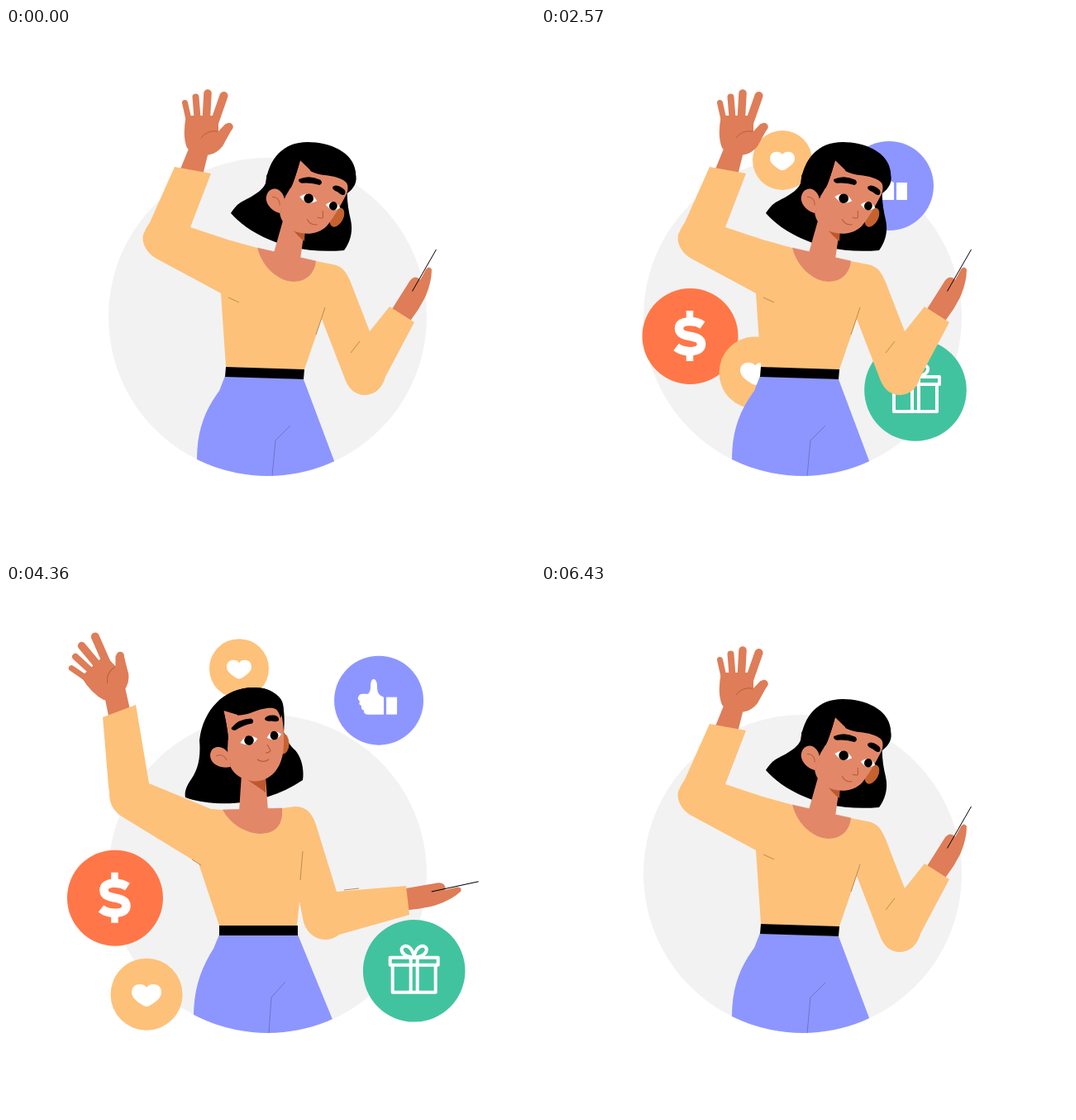
Write an HTML page that moves like this. It is 640 px wide and 640 px high and loops after 7.21 s.

```html
<!DOCTYPE html>
<html lang="en">
<head>
<meta charset="utf-8">
<title>Waving woman with reward icons</title>
<style>
  html, body { margin: 0; width: 100%; height: 100%; overflow: hidden; background: #fff; }
  svg { display: block; width: 100%; height: 100%; }
</style>
</head>
<body>
<svg viewBox="0 0 640 640" xmlns="http://www.w3.org/2000/svg">
  <defs>
    <clipPath id="disc"><circle cx="316.5" cy="349.5" r="192.5"/></clipPath>
    <clipPath id="open"><rect id="lidEdge" x="-16" y="-8" width="32" height="20"/></clipPath>
    <path id="heart" d="M0-7C-3-12-15-12-15-2C-15 4-8 8-3 11.5Q0 13 3 11.5C8 8 15 4 15-2C15-12 3-12 0-7Z" fill="#fff"/>
    <g id="thumb" fill="#fff">
      <path d="M6 17L-14 17Q-19 16-18 12Q-22 11-21 6.5Q-25 5-23 1Q-27-2-24-6Q-23-8-20-8L-13-8Q-10-11-10-17Q-10-26-6-26Q-2-25-2-16Q-2-9 2-6L6-4Z"/>
      <rect x="9" y="-4" width="13" height="21"/>
    </g>
    <g id="dollar" fill="none" stroke="#fff">
      <path d="M15-13.500C7-19-13.500-21-13.500-9.500C-13.500 4 13.500-4 13.500 9.500C13.500 21-8 20-17 13" stroke-width="10.500"/>
      <path d="M-.5-31V-18M-.5 18V30" stroke-width="8.500"/>
    </g>
    <g id="gift" fill="none" stroke="#fff" stroke-width="4" stroke-linejoin="round">
      <rect x="-29" y="-16" width="58" height="9"/>
      <path d="M-26-6V26H26V-6M-4-16V26M4-16V26"/>
      <path d="M0-16C-10-17-16-21-15-27C-12-33-2-31 0-16C2-31 12-33 15-27C16-21 10-17 0-16"/>
    </g>
    <g id="eye">
      <path d="M-11 1Q-1-11 10.500 0Q1 10-11 1Z" fill="#fff"/>
      <circle r="5.800"/>
    </g>
  </defs>

  <circle cx="316.5" cy="349.5" r="192.5" fill="#f2f2f2"/>
  <g id="dashes" stroke="#42c39f" stroke-width="8" stroke-linecap="round"></g>
  <g id="icons"></g>

  <path id="hair"/>
  <g clip-path="url(#disc)">
    <path id="pants" fill="#8d96ff"/>
    <path id="crease" fill="none" stroke="#6c74cc"/>
  </g>
  <path id="neck" fill="#e28869"/>
  <path id="shade" fill="#bd582e"/>
  <path id="chest" fill="#e28869" stroke="#e28869" stroke-width=".6"/>
  <path id="forearm" fill="#de7d58"/>
  <g id="wave" fill="#de7d58" stroke-linecap="round">
    <path d="M218 106Q213 130 219 145Q226 153 245 153.500Q255 152 262 143L273.500 122L266 115.500L257 125V106Z"/>
    <g stroke="#de7d58">
      <path d="M222 115L216.500 90.500" stroke-width="7"/>
      <path d="M232 115L229.500 83.500" stroke-width="8"/>
      <path d="M242 115L244 79" stroke-width="9.500"/>
      <path d="M252 115L263.500 82" stroke-width="10"/>
      <path d="M256 138L270 119.500" stroke-width="9.500"/>
    </g>
    <path d="M236 133Q243 123 256 125" fill="none" stroke="#b5603c"/>
  </g>
  <g id="palm">
    <path d="M459 353L467 340L486 310Q490 302 495 301.500Q500 302 501 305L508 292Q512 287 515 292Q515 308 507 326Q500 340 490 353L483 365Z" fill="#de7d58"/>
    <path d="M491.500 318.500L520.500 268" stroke="#000"/>
  </g>
  <path id="sweater" fill="#fdc17a"/>
  <path id="folds" fill="none" stroke="#b98d50"/>
  <path id="belt"/>

  <g id="head">
    <ellipse cx="335" cy="192" rx="7.500" ry="12.500" fill="#c5622f"/>
    <path id="face" fill="#e28869"/>
    <path d="M263.500 153C275 160 288 158 298 154C308 150 320 147 326 150C329 152 331 156 332 161C337 152 337 142 330 135C322 127 312 124 300 124C265 124 238 150 236 188L252 205L270 186Z"/>
    <path d="M272 220C264 222 254 220 249 213C244 204 249 195 258 196C264 197 268 201 270 205Z" fill="#e28869"/>
    <path d="M254 207Q263 203 267 212" fill="none" stroke="#b5603c"/>
    <path d="M263.500 152C267 167 271 182 268 204L280 204L280 157Z" fill="#e28869"/>
    <path d="M272.500 173Q281 162 296 161.500Q301 163 298 167.500Q288 169 278 175.500Q273 176.500 272.500 173Z"/>
    <path d="M313 162Q314.500 157 324 157.500Q331 158.500 330 164Q328 166 321 164.500Q314 165.500 313 162Z"/>
    <g id="lids" fill="#d06b42">
      <ellipse cx="294" cy="187" rx="11" ry="6" transform="rotate(-11 294 187)"/>
      <ellipse cx="324.5" cy="182" rx="9" ry="5.500" transform="rotate(-11 324.500 182)"/>
    </g>
    <g transform="translate(294 188) rotate(-11)"><use href="#eye" clip-path="url(#open)"/></g>
    <g transform="translate(324.500 182) rotate(-11) scale(.84 .92)"><use href="#eye" clip-path="url(#open)"/></g>
    <path d="M316 193L320 200Q319 203 314 203M304 211Q311 216 318 211" fill="none" stroke="#b9572f"/>
  </g>
</svg>

<script>
const LOOP = 7210;
const $ = id => document.getElementById(id);
const clamp = x => Math.min(1, Math.max(0, x));
const smooth = x => x * x * (3 - 2 * x);
const cubic = x => x < .5 ? 4 * x ** 3 : 1 - 4 * (1 - x) ** 3;
const seg = (t, start, dur, ease = smooth) => ease(clamp((t - start) / dur));
const blend = (a, m, b, p) => a + (b - a) * p + 4 * p * (1 - p) * (m - (a + b) / 2);

function make(tag, attrs, parent) {
  const el = document.createElementNS('http://www.w3.org/2000/svg', tag);
  for (const k in attrs) el.setAttribute(k, attrs[k]);
  return parent.appendChild(el);
}

// Paths bend from the leaning pose through the middle to the waving pose.
function morph(id, a, b, mid) {
  const nums = s => s.match(/[\d.]+/g).map(Number);
  const A = nums(a), B = nums(b), M = mid ? nums(mid) : A.map((v, i) => (v + B[i]) / 2);
  return p => {
    let i = 0;
    $(id).setAttribute('d', a.replace(/[\d.]+/g, () => {
      const v = blend(A[i], M[i], B[i], p);
      i++;
      return v.toFixed(2);
    }));
  };
}

function rigid(id, origin, a, m, b, turn) {
  return p => {
    const x = blend(a[0], m[0], b[0], p), y = blend(a[1], m[1], b[1], p);
    $(id).setAttribute('transform',
      `translate(${x} ${y}) rotate(${turn(p)}) translate(${-origin[0]} ${-origin[1]})`);
  };
}

const collarA = '304 266 C310 290 330 307 348 307 C365 307 374 295 375 282';
const collarM = '282 273 C291 293 308 308 327 308 C345 308 355 297 355 280';
const collarB = '262 272 C272 291 292 301 308 301 C327 301 336 289 334 270';

const body = [
  morph('hair',
    'M365 138 C335 138 318 158 314 188 C308 202 285 208 279 215 C276 218 273 222 272 224 C293 248 340 275 409 269 C417 258 420 245 417 232 C414 220 412 205 413 194 C420 194 424 186 423 174 C420 150 392 138 365 138Z',
    'M300 124 C265 124 238 150 234 188 C236 212 231 226 222 238 C217 246 216 252 217 257 C250 269 310 269 359 236 C361 222 357 208 350 200 C343 194 340 188 336 178 C337 165 337 155 335 146 C332 133 318 124 300 124Z',
    'M335 137 C298 137 276 160 274 195 C274 210 262 220 252 231 C246 237 243 242 242 247 C268 267 330 279 385 259 C391 245 389 235 385 224 C379 212 378 200 377 186 C381 180 382 172 380 163 C375 147 355 137 335 137Z'),
  morph('pants',
    'M265 421 L360 425 L405 545 L231 545 L231 522 C231 490 239 464 258 439Z',
    'M258 423 L353 423 L403 545 L226 545 L227 518 C228 485 237 462 251 440Z'),
  morph('crease', 'M344 481 L326 499 L322 542', 'M338 480 L321 499 L318 542'),
  morph('neck',
    'M337 226 L324 272 L340 290 L356 280 L361 245Z',
    'M285 228 L282 274 L300 285 L317 274 L314 232Z',
    'M310 230 L304 276 L320 290 L337 281 L338 240Z'),
  morph('shade',
    'M347 244 Q354 253 361 258 L362 242Z',
    'M288 233 Q303 243 314 251 L314 230Z',
    'M318 242 Q329 254 337 259 L338 238Z'),
  morph('chest', `M${collarA}Z`, `M${collarB}Z`, `M${collarM}Z`),
  morph('forearm',
    'M221 146 L208 178 L237 182 L245 150Z',
    'M119 134 L126 168 L153 164 L144 124Z'),
  morph('sweater',
    `M204 168 L248 176 L223 241 L268 256 L${collarA} L395 286 C408 288 412 297 416 305 L440 367 L464 337 L494 356 L459 422 C454 440 442 444 434 444 C422 444 415 436 411 427 L382 352 L361 413 L266 410 L260 321 L182 279 C167 271 162 254 168 246 C170 240 173 238 175 233Z`,
    `M117 160 L157 145 L173 240 L248 271 L${collarB} L350 268 C366 268 372 281 375 290 L400 371 L484 364 L488 399 L403 423 C396 428 392 429 385 429 C372 428 364 420 360 408 L355 383 L352 412 L258 412 L233 337 L140 280 C128 272 125 262 125 252 C125 248 124 246 124 243Z`,
    `M161 164 L204 161 L196 245 L262 271 L${collarM} L373 282 C385 284 390 293 393 300 L422 377 L478 349 L497 378 L428 433 C422 439 416 441 410 441 C398 440 391 434 388 425 L367 367 L356 412 L262 411 L247 334 L158 283 C146 275 144 265 146 252 C147 248 147 246 148 243Z`),
  morph('folds',
    'M269 326 L282 332 M386 338 L375 371 M428 379 L417 393',
    'M225 332 L236 339 M359 322 L356 357 M427 367 L409 369',
    'M247 334 L258 340 M373 335 L366 369 M429 373 L412 382'),
  morph('belt',
    'M266 410 L361 413 L360 425 L265 422Z',
    'M258 412 L353 412 L353 424 L258 424Z'),
  morph('face',
    'M263 148 C266 165 270 180 268 198 L272 221 C278 228 286 232 298 231 C313 229 325 220 329 207 C332 192 333 170 331 146Z',
    'M263 148 C266 165 270 180 268 198 L272 221 C277 230 286 236 300 237.5 C319 238 333 223 335.5 200 C337 185 336 165 331 146Z'),
  rigid('wave', [238, 128], [238, 128], [179, 120], [120.5, 113.5], p => -43 * p),
  rigid('palm', [492, 318], [492, 318], [511, 342], [515.5, 371], p => 48 * p),
  rigid('head', [258, 208], [325, 207], [291, 211.5], [258, 208], p => 28 * (1 - p))
];

const icons = [
  { art: 'heart', fill: '#fdc17a', from: [292, 160], to: [276, 66], r: 36, ring: 39.5, mid: 165 },
  { art: 'thumb', fill: '#8d96ff', from: [421, 191], to: [469, 109], r: 54, ring: 61, mid: 137 },
  { art: 'dollar', fill: '#ff7748', from: [180.5, 373], to: [103, 382], r: 58, ring: 66, mid: 28 },
  { art: 'gift', fill: '#42c39f', from: [453, 438], to: [518, 484], r: 61.8, ring: 68, mid: 102 },
  { art: 'heart', fill: '#fdc17a', from: [259, 417], to: [117, 542], r: 43.5, ring: 50, mid: 135, lag: 46 }
];
for (const c of icons) {
  c.el = make('g', {}, $('icons'));
  c.arc = make('circle', { r: c.ring, pathLength: 360, fill: 'none', stroke: c.fill,
    'stroke-width': 2.8, 'stroke-linecap': 'round' }, c.el);
  make('circle', { r: c.r, fill: c.fill }, c.el);
  make('use', { href: '#' + c.art, transform: c.lag ? 'scale(1.2)' : '' }, c.el);
}

const dashes = [
  { y: 281, from: 474, to: 616, starts: [365, 3180] },
  { y: 474, from: 173, to: 31, starts: [1000, 3555] }
].flatMap(d => d.starts.map(start =>
  ({ ...d, start, el: make('line', { y1: d.y, y2: d.y }, $('dashes')) })));

function drawIcon(c, t) {
  const lag = c.lag || 0;
  const out = seg(t, 122 + lag, 780) - seg(t, 2250, 310) + seg(t, 4010, 600) - seg(t, 5810, 310);
  const size = seg(t, 70, 260) - seg(t, 6110, 320);
  const [x, y] = c.from.map((v, i) => v + (c.to[i] - v) * out);
  c.el.setAttribute('transform', `translate(${x} ${y}) scale(${size})`);
  c.el.style.display = size > .001 ? '' : 'none';

  const start = t < 3000 ? 820 : 4640;
  const head = 280 * seg(t, start, 610), tail = 280 * seg(t, start + 250, 610);
  c.arc.style.display = head - tail > .5 ? '' : 'none';
  c.arc.setAttribute('stroke-dasharray', `${head - tail} 360`);
  c.arc.setAttribute('transform', `rotate(${c.mid - 140 + tail})`);
}

function drawDash(d, t) {
  const head = seg(t, d.start, 620), tail = seg(t, d.start + 175, 620);
  const at = k => d.from + (d.to - d.from) * k;
  d.el.style.display = head - tail > .01 ? '' : 'none';
  d.el.setAttribute('x1', at(tail));
  d.el.setAttribute('x2', at(head));
}

function draw(t) {
  const pose = seg(t, 75, 790, cubic) - seg(t, 1740, 760, cubic)
    + seg(t, 3600, 800, cubic) - seg(t, 5430, 760, cubic);
  body.forEach(move => move(pose));

  const shut = Math.max(...[470, 2120, 4000, 5810]
    .map(mid => smooth(clamp((200 - Math.abs(t - mid)) / 160))));
  $('lidEdge').setAttribute('y', -8 + 15 * shut);
  $('lids').setAttribute('opacity', Math.min(1, shut * 2));

  icons.forEach(c => drawIcon(c, t));
  dashes.forEach(d => drawDash(d, t));
}

const begin = performance.now();
function tick() {
  draw((performance.now() - begin) % LOOP);
  requestAnimationFrame(tick);
}
draw(0);
requestAnimationFrame(tick);
</script>
</body>
</html>
```
